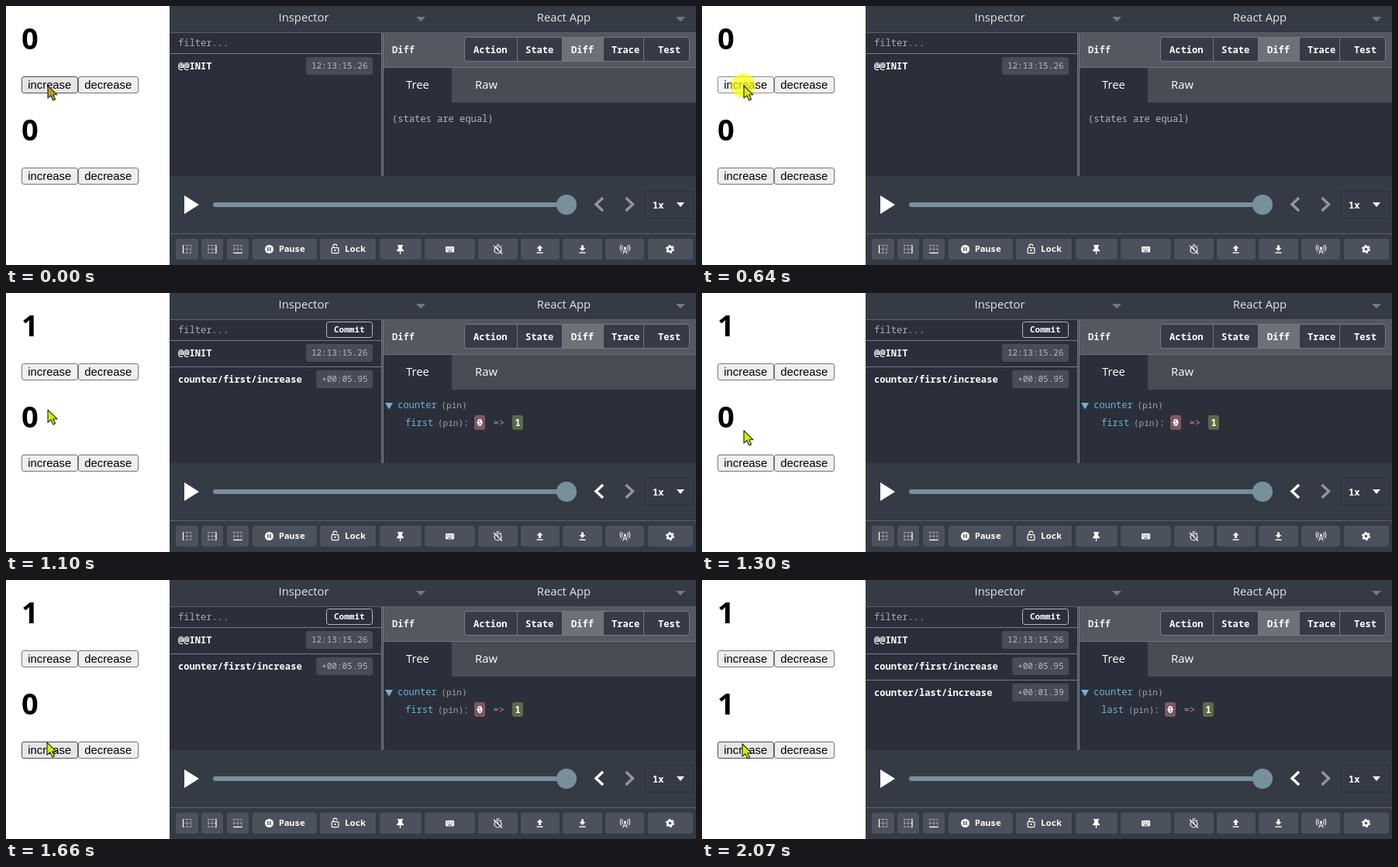
Recreate the animation shown at these times as an HTML page. Size 890x335 px, loop 2.45 s.

```html
<!DOCTYPE html>
<html lang="en">
<head>
<meta charset="utf-8">
<title>Counter with state inspector</title>
<style>
html, body { margin: 0; width: 100%; height: 100%; overflow: hidden; background: #fff; }
svg { display: block; width: 890px; height: 335px; }
text { white-space: pre; }
.mono { font-family: "Noto Sans Mono", monospace; font-size: 12.1px; }
.small { font-family: "Noto Sans Mono", monospace; font-size: 11px; }
.bold { font-weight: 700; }
.ui { font-family: "Open Sans", sans-serif; font-size: 14.8px; }
.count { font-family: "Noto Sans", sans-serif; font-size: 38px; font-weight: 700; }
.button { font-family: "Liberation Sans", Arial, sans-serif; font-size: 14.8px; }
</style>
</head>
<body>
<svg id="stage" viewBox="0 0 890 335" xmlns="http://www.w3.org/2000/svg"></svg>
<script>
const LOOP = 2450;
const CLICKS = [560, 1890];
const UPDATES = [740, 2070];
const BG = '#2a2f3a', BAR = '#353b45', KEY = '#4c525d', LINE = '#757a84', BLUE = '#6fb3d2';

const rect = (x, y, w, h, fill, extra = '') =>
  `<rect x="${x}" y="${y}" width="${w}" height="${h}" fill="${fill}" ${extra}/>`;
const text = (x, y, str, cls, fill, extra = '') =>
  `<text x="${x}" y="${y}" class="${cls}" fill="${fill}" ${extra}>${str}</text>`;
const path = (d, fill, extra = '') => `<path d="${d}" fill="${fill}" ${extra}/>`;
const stroke = (d, color, width = 1, extra = '') =>
  path(d, 'none', `stroke="${color}" stroke-width="${width}" ${extra}`);
const group = (id, body, extra = '') => `<g id="${id}" ${extra}>${body}</g>`;
const at = (x, y, body) => `<g transform="translate(${x} ${y})">${body}</g>`;

function counter(id, y) {
  const box = (x, w, name) =>
    rect(x + .5, y + 63.5, w - 1, 21, '#efefef', `rx="2.5" stroke="#767676" id="${name}"`);
  return text(20, y + 27.5, '0', 'count', '#000', `id="count${id}"`) +
    box(20, 73, 'inc' + id) + box(93, 78, 'dec' + id) +
    text(28.3, y + 79, 'increase', 'button', '#000') +
    text(101.3, y + 79, 'decrease', 'button', '#000');
}

function logRow(y, label, time) {
  const w = time.length * 6.6 + 13.5;
  return text(222, y + 20, label, 'mono bold', '#fff') +
    rect(473 - w, y + 4, w, 23, '#474c57', 'rx="3"') +
    text(480 - w, y + 19, time, 'small', '#b9bbbe');
}

const hline = (y, x = 211, w = 273, color = LINE) => rect(x, y, w, 1, color);

function header() {
  return rect(211, 0, 679, 335, BAR) +
    text(384, 20, 'Inspector', 'ui', '#e3e4e6', 'text-anchor="middle"') +
    text(719.5, 20, 'React App', 'ui', '#e3e4e6', 'text-anchor="middle"') +
    path('M529 14h12l-6 6zM864 14h12l-6 6z', '#737983') +
    hline(34, 211, 679, '#5b606a');
}

function inspector() {
  const tabs = [['Action', 591, 603], ['State', 659, 670], ['Diff', 717, 729],
                ['Trace', 770, 781], ['Test', 822, 841]];
  return rect(211, 35, 679, 185, BG) +
    text(222, 52, 'filter...', 'mono', '#a9acb0') + hline(61) +
    logRow(62, '@@INIT', '12:13:15.26') +
    group('row0', hline(95) + logRow(96, 'counter/first/increase', '+00:05.95')) +
    group('row1', hline(129) + logRow(130, 'counter/last/increase', '+00:01.39')) +
    `<clipPath id="list"><rect x="211" y="35" width="273" height="26"/></clipPath>` +
    `<g clip-path="url(#list)">` + group('commit',
      rect(413.5, 37.5, 59, 20, BG, 'rx="3" stroke="#b9bcc1"') +
      text(423, 51, 'Commit', 'small bold', '#fff')) + '</g>' +
    rect(484, 35, 3, 185, '#454a54') + rect(484, 35, 1, 185, LINE) + rect(486, 35, 1, 185, LINE) +
    rect(487, 35, 403, 45, '#545961') + hline(79, 487, 403, '#6c7179') +
    text(498, 61, 'Diff', 'mono', '#f0f0f0', 'font-weight="600"') +
    rect(591.5, 40.5, 290, 31, '#363b46', 'rx="3"') +
    rect(717, 41, 53, 31, '#6d7279') +
    rect(591.5, 40.5, 290, 31, 'none', 'rx="3" stroke="#747982"') +
    tabs.map(([name, edge, x], i) => (i ? rect(edge, 41, 1, 31, '#747982') : '') +
      text(x, 61, name, 'mono bold', '#fff')).join('') +
    rect(487, 80, 403, 45, '#484c55') + rect(487, 80, 88, 45, BG) +
    text(516, 107, 'Tree', 'ui', '#fff') + text(605, 107, 'Raw', 'ui', '#fff');
}

function diffTree() {
  const value = (x, n, fill) => rect(x, 158, 14, 19, fill, 'rx="3"') +
    text(x + 3.4, 172, n, 'mono bold', '#fff');
  return group('equal', text(498, 150, '(states are equal)', 'mono', '#b4b6b9')) +
    group('diff',
      path('M489 142h10l-5 8.5z', BLUE) + text(505, 149, 'counter', 'mono', BLUE) +
      text(561.5, 149, '(pin)', 'small', '#a5a7ab') +
      text(515, 172, 'first', 'mono', BLUE, 'id="key"') +
      group('change',
        text(557, 172, '(pin)', 'small', '#a5a7ab') + text(590, 172, ':', 'mono', BLUE) +
        value(604, '0', '#7d5663') + rect(607, 167, 8, 1, '#fff') +
        text(628.5, 172, '=&gt;', 'mono', '#c07bb2') + value(653, '1', '#5b6b45')));
}

function slider() {
  const chevron = 'stroke-linejoin="miter"';
  return rect(211, 220, 679, 115, BAR) +
    path('M230 245l19 12-19 12z', '#fff') +
    stroke('M270 257H723', '#78909b', 6, 'stroke-linecap="round"') +
    `<circle cx="723" cy="257" r="13" fill="#78909b"/>` +
    stroke('M770 248l-9 8.5 9 8.5', '#91969e', 3.4, chevron + ' id="back"') +
    stroke('M799.5 248l9 8.5-9 8.5', '#91969e', 3.4, chevron) +
    rect(824.5, 239.5, 62, 35, 'none', 'rx="3" stroke="#282d37"') +
    text(834, 262, '1x', 'mono bold', '#fff') +
    path('M865 254h10l-5 6z', '#fff') + hline(294, 211, 679, '#5b606a');
}

function dockIcon(side) {
  const dots = 'stroke-dasharray="1.3 1.5"';
  const solid = { left: 'M-5-5V5.5', right: 'M5-5V5.5', bottom: 'M-5.5 5H5.5' }[side];
  return stroke('M-5.5-5H5.5M-5.5 0H5.5M-5.5 5H5.5M-5-5V5M0-5V5M5-5V5', '#c9ccd0', 1, dots) +
    stroke(solid, '#fff', 1.2);
}

function toolbar() {
  const W = '#fff';
  const spans = [[219, 248], [252, 280], [285, 313], [318, 401], [405, 477], [482, 536],
                 [540, 605], [609, 660], [664, 714], [718, 769], [773, 823], [828, 886]];
  const pin = path('M-3.5-5.5h7v1.5h-1v3.5l2 2v1.2h-3.9v3.8h-1.2v-3.8h-3.9v-1.2l2-2v-3.5h-1z', W);
  const keyboard = rect(-5.5, -3.5, 11, 7.5, W, 'rx="1"') +
    stroke('M-4-1.5H4.5M-4 .5H4.5', KEY, 1, 'stroke-dasharray="1 1"') + stroke('M-2.5 2.5h5', KEY);
  const timer = `<circle cy="1" r="4.5" fill="none" stroke="#fff" stroke-width="1.2"/>` +
    stroke('M-2-5.5h4M0-1.5v2.5M3.5-3l1-1M-5.5-4.5L5.5 6', W, 1.2);
  const arrow = dir => path(`M0 ${dir > 0 ? 2.5 : -5}l4 ${-4 * dir}h-2.5v-3.5h-3v3.5h-2.5z`
    .replace(/-3\.5h-3v3\.5/, dir > 0 ? '-3.5h-3v3.5' : '3.5h-3v-3.5'), W) + rect(-4, 4, 8, 1.4, W);
  const antenna = `<circle cy="-1.5" r="1.5" fill="#fff"/>` +
    stroke('M0-1L-3 6M0-1L3 6M-2 3.5h4M-3-4.5q-2 3 0 6M3-4.5q2 3 0 6M-5-6q-3 4.5 0 9M5-6q3 4.5 0 9', W);
  const gear = `<circle r="3.1" fill="none" stroke="#fff" stroke-width="2.6"/>` +
    `<circle r="4.8" fill="none" stroke="#fff" stroke-width="1.6" stroke-dasharray="2.5 2.53"/>`;
  const icons = [[233.5, dockIcon('left')], [266, dockIcon('right')], [299, dockIcon('bottom')],
    [508.5, pin], [572.5, keyboard], [634.5, timer], [688.5, arrow(-1)], [743.5, arrow(1)],
    [798.5, antenna], [856.5, gear]];
  return spans.map(([a, b]) => rect(a, 301, b - a, 27, KEY, 'rx="3"')).join('') +
    icons.map(([x, body]) => at(x, 314.5, body)).join('') +
    `<circle cx="339.5" cy="314.5" r="5.5" fill="#fff"/>` +
    stroke('M338 312v5M341 312v5', KEY, 1.5) +
    text(352, 318, 'Pause', 'small bold', W, 'style="font-size:11.3px"') +
    rect(420.1, 312.6, 8.8, 7, 'none', 'rx="1" stroke="#fff" stroke-width="1.2"') +
    stroke('M422 312.5v-2q0-2.3 2.4-2.3t2.4 2.3', W, 1.2) + rect(423.5, 315, 2, 2, W) +
    text(437, 318, 'Lock', 'small bold', W, 'style="font-size:11.3px"');
}

document.getElementById('stage').innerHTML =
  rect(0, 0, 890, 335, '#fff') + counter(0, 28) + counter(1, 146) +
  header() + inspector() + diffTree() + slider() + toolbar() +
  `<circle id="halo" r="15.5" fill="#ffff00" fill-opacity=".7"/>` +
  path('M0 0V16.2L3.8 12.8 6.8 19 9.6 17.7 6.8 11.8H12Z', '#c8ff00',
    'id="cursor" stroke="#222" stroke-width="1.1" stroke-linejoin="round"');

const el = id => document.getElementById(id);
const show = (id, on) => el(id).setAttribute('visibility', on ? 'visible' : 'hidden');
const set = (id, name, value) => el(id).setAttribute(name, value);

const CURSOR = [[0, 54, 103], [870, 54, 103], [1050, 54, 140], [1100, 54, 151],
  [1480, 54, 202], [1610, 54, 207], [1660, 53, 210], [1710, 52, 212], [LOOP, 52, 212]];

function cursorAt(t) {
  const i = CURSOR.findIndex(k => k[0] > t);
  const [t0, x0, y0] = CURSOR[i - 1], [t1, x1, y1] = CURSOR[i];
  const p = (t - t0) / (t1 - t0);
  return [x0 + (x1 - x0) * p, y0 + (y1 - y0) * p];
}

const BUTTON = { idle: ['#efefef', '#767676'], hover: ['#e5e5e5', '#4f4f4f'], active: ['#f5f5f5', '#8d8d8d'] };

function render(t) {
  const [x, y] = cursorAt(t);
  const halo = CLICKS.some(c => t >= c && t < c + 150);
  const first = t >= UPDATES[0], last = t >= UPDATES[1];

  set('cursor', 'transform', `translate(${x} ${y})`);
  set('cursor', 'fill', t < CLICKS[0] ? '#b3a11c' : halo ? '#dcec00' : '#c8f400');
  set('halo', 'cx', x - 1);
  set('halo', 'cy', y);
  show('halo', halo);

  const pressed = [t >= 610 && t < 710, t >= 1890 && t < 2040];
  const hovered = [y < 113, t >= 1660];
  [0, 1].forEach(i => {
    const [fill, border] = BUTTON[pressed[i] ? 'active' : hovered[i] ? 'hover' : 'idle'];
    set('inc' + i, 'fill', fill);
    set('inc' + i, 'stroke', border);
    el('count' + i).textContent = t >= UPDATES[i] ? 1 : 0;
    show('row' + i, t >= UPDATES[i]);
  });

  show('equal', !first);
  show('diff', first);
  el('key').textContent = last ? 'last' : 'first';
  set('change', 'transform', `translate(${last ? -7 : 0} 0)`);
  set('back', 'stroke', first ? '#fff' : '#91969e');

  // The commit button slides in, slowing towards its place.
  const p = Math.min(1, Math.max(0, (t - UPDATES[0]) / 200));
  set('commit', 'transform', `translate(${72 * Math.pow(1 - p, 2.2)} 0)`);
  show('commit', first);
}

const start = performance.now();
function tick() {
  render((performance.now() - start) % LOOP);
  requestAnimationFrame(tick);
}
render(0);
requestAnimationFrame(tick);
</script>
</body>
</html>
```
